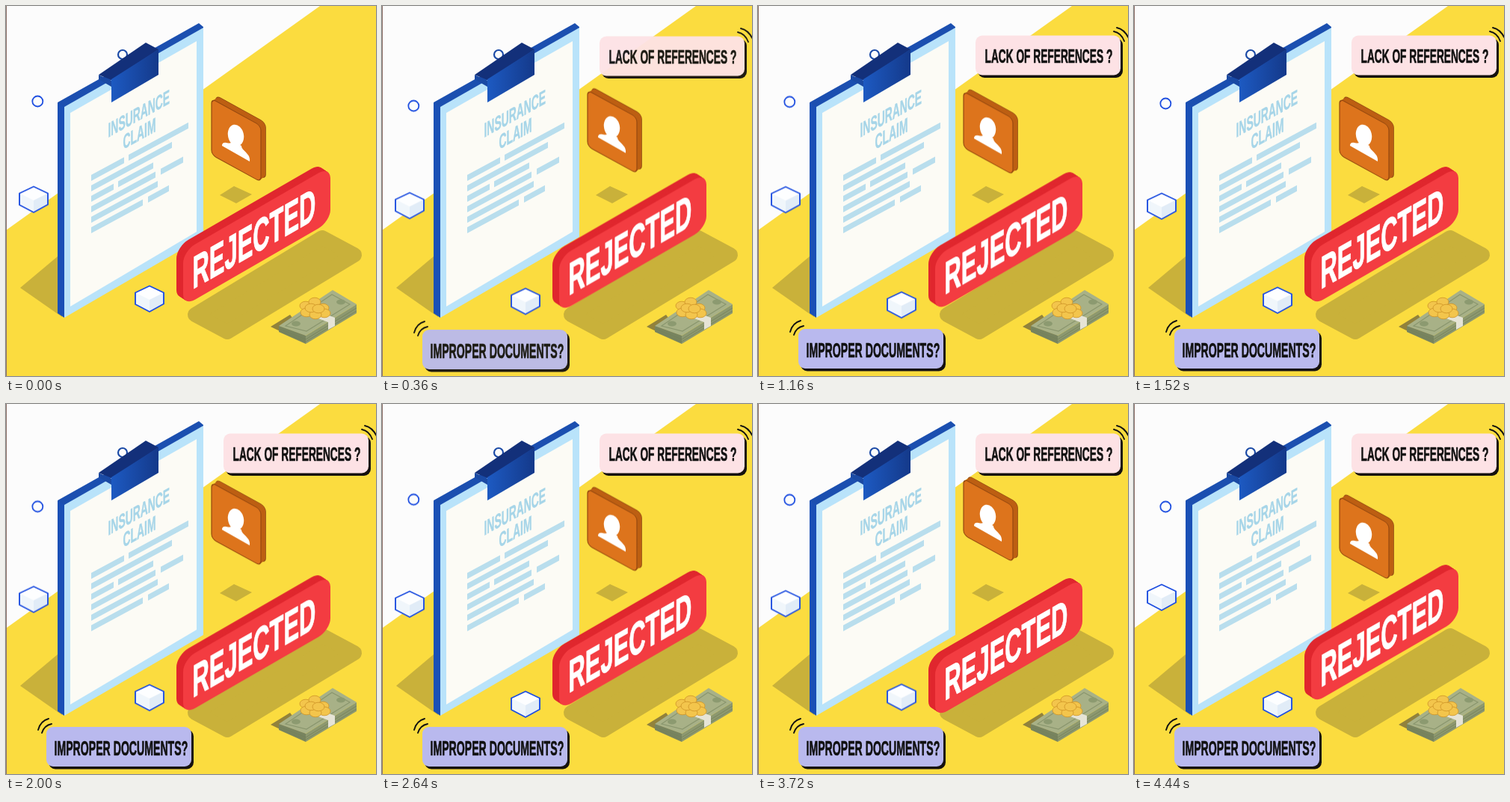
Write an HTML page that moves like this. It is 495 px wide and 495 px high and loops after 4480 ms.

```html
<!DOCTYPE html>
<html lang="en">
<head>
<meta charset="utf-8">
<title>Insurance claim rejected</title>
<style>
  html, body { margin: 0; width: 100%; height: 100%; overflow: hidden; background: #fcfcfc; }
  svg { display: block; width: 495px; height: 495px; }
  text { font-family: "Liberation Sans", Arial, sans-serif; font-weight: 700; stroke-linejoin: round; }

  .bob { animation: bob 1493.333ms ease-in-out infinite; }
  .stamp { --dy: 18px; }
  .tile { --dy: -24px; }
  .boxA { --dy: 10px; animation-duration: 1120ms; animation-delay: -40ms; }
  .boxB { --dy: 10px; animation: bob5 4480ms ease-in-out infinite; }
  .dot { --dy: 10px; animation: bob7 4480ms ease-in-out infinite; }
  .bubble { animation: enter 4480ms cubic-bezier(.2, .7, .3, 1) infinite; }

  @keyframes bob {
    0%, 100% { transform: translateY(0); }
    50% { transform: translateY(var(--dy)); }
  }
  /* an odd number of half swings, so the loop ends on the far side */
  @keyframes bob5 {
    0%, 40%, 80% { transform: translateY(0); }
    20%, 60%, 100% { transform: translateY(var(--dy)); }
  }
  @keyframes bob7 {
    0%, 28.571%, 57.143%, 85.714% { transform: translateY(0); }
    14.286%, 42.857%, 71.429%, 100% { transform: translateY(var(--dy)); }
  }
  @keyframes enter {
    0%, .8% { opacity: 0; transform: translateY(24px); }
    12.5%, 100% { opacity: 1; transform: none; }
  }
</style>
</head>
<body>
<svg viewBox="0 0 495 495" xmlns="http://www.w3.org/2000/svg">
  <defs>
    <linearGradient id="clipFront" x1="0" y1="0" x2="1" y2="0">
      <stop offset="0" stop-color="#1d5ac2"/>
      <stop offset="1" stop-color="#14398a"/>
    </linearGradient>
    <g id="box">
      <path d="M37 241.500 56 250.500V265.500L37 276 18 266V250.500Z" fill="#fdfeff"/>
      <path d="M37 260 55 251V265L37 275Z" fill="#e1ecf7"/>
      <path d="M37 260 19 251V266L37 275Z" fill="#f0f6fb"/>
      <path d="M37 241.500 56 250.500V265.500L37 276 18 266V250.500Z" fill="none" stroke="#1f4fe0" stroke-width="1.900" stroke-linejoin="round"/>
    </g>
    <rect id="plate" width="197" height="74" rx="16" transform="matrix(1 -.577 0 1 237 328)"/>
    <rect id="card" width="66" height="75" rx="6" transform="matrix(1 .55 0 1 275 124)"/>
  </defs>

  <rect width="495" height="495" fill="#fcfcfc"/>
  <path d="M420 0H495V495H0V300Z" fill="#fbdc3f"/>
  <rect width="1" height="495" fill="#8d6f68"/>

  <!-- ground shadows -->
  <g fill="#c9b13a">
    <path d="M19 377 75 330V416Z"/>
    <path d="M286 253 305 241 329 252 308 264Z"/>
    <path d="M253 413 423 310 466 333 296 436Z" stroke="#c9b13a" stroke-width="20" stroke-linejoin="round"/>
  </g>

  <!-- clipboard -->
  <path d="M69 129 258 23 264 28V40L78 146Z" fill="#1b4fb0"/>
  <path d="M69 129 78 135V417L69 411Z" fill="#1a50b6"/>
  <path d="M78 135 264 29V309L78 417Z" fill="#b9e3fa"/>
  <path d="M86 143 255 47V302L86 402Z" fill="#fcfbf5"/>
  <circle cx="156" cy="65" r="6" fill="none" stroke="#1b4aa6" stroke-width="2.200"/>
  <path d="M124 92 141 100V108L124 98Z" fill="#1a4aa4"/>
  <path d="M124 92 187 49 204 58 141 99Z" fill="#13307a"/>
  <path d="M141 98 204 58V92L141 129Z" fill="url(#clipFront)"/>
  <g fill="#a6d5e8" stroke="#a6d5e8" stroke-width=".5" font-size="27">
    <text transform="matrix(.515 -.286 0 1 136.500 176)">INSURANCE</text>
    <text transform="matrix(.515 -.286 0 1 156.500 192)">CLAIM</text>
  </g>
  <g id="lines" fill="#b9deed"></g>

  <g class="bob dot"><circle cx="42.300" cy="127.500" r="7" fill="none" stroke="#1f4fe0" stroke-width="1.800"/></g>
  <g class="bob boxA"><use href="#box"/></g>
  <g class="bob boxB"><use href="#box" x="155" y="133"/></g>

  <!-- money -->
  <path d="M354 429 380 413 401 441 385 444Z" fill="#91823c"/>
  <path d="M365 428 401 441V452L365 436Z" fill="#78845f"/>
  <path d="M401 441 469 399V411L401 452Z" fill="#8d986f"/>
  <path d="M365 428 437 380 469 399 401 441Z" fill="#a8b187"/>
  <path d="M374 428 436 386 460 399 402 435Z" fill="none" stroke="#8a966e" stroke-width="1.200"/>
  <path d="M366 432 401 446 469 404M366 434.500 401 449 469 408" fill="none" stroke="#74805a" stroke-width=".8"/>
  <ellipse cx="388" cy="425" rx="6" ry="3.500" fill="#8c9a70"/>
  <ellipse cx="448" cy="396" rx="6" ry="3.500" fill="#8c9a70"/>
  <path d="M394 409 403 403 440 417V428L431 433V423Z" fill="#e6e4d6"/>
  <g id="coins" fill="#f3c54c" stroke="#d39a2c" stroke-width=".9"></g>

  <!-- person tile -->
  <g class="bob tile">
    <use href="#card" x="6" y="-4" fill="#bd5f13" stroke="#8a430f" stroke-width="1.600"/>
    <g data-extrude="card" data-dx="6" data-dy="-4" fill="#bd5f13"></g>
    <use href="#card" fill="#dd741c" stroke="#94480f" stroke-width="1.200"/>
    <g fill="#fff">
      <ellipse cx="307.500" cy="173" rx="10.500" ry="14.500" transform="rotate(-12 307.500 173)"/>
      <path d="M302 180 315 187C315 191 318 192 322 197Q327 202 326 208L289 187Q289 182 295 183C300 184 302 184 302 180Z"/>
    </g>
  </g>

  <!-- rejected plate -->
  <g class="bob stamp">
    <g data-extrude="plate" data-dx="-9" data-dy="-6" fill="#e0272e"></g>
    <use href="#plate" fill="#f33c41"/>
    <text font-size="61" fill="#fff" stroke="#fff" stroke-width="1.200" transform="matrix(.507 -.29 0 1 249.500 379)">REJECTED</text>
  </g>

  <!-- speech bubbles -->
  <g class="bubble">
    <rect x="294" y="43" width="194" height="53" rx="9" fill="#15110f"/>
    <rect x="291" y="39.500" width="194" height="53" rx="9" fill="#fde2e5"/>
    <text font-size="26" fill="#111" stroke="#111" stroke-width=".7" transform="matrix(.528 0 0 1 303.500 75.500)">LACK OF REFERENCES ?</text>
    <path d="M480 29Q490 31 496 43M476 34Q486 36 490 47" fill="none" stroke="#111" stroke-width="1.900" stroke-linecap="round"/>
  </g>
  <g class="bubble">
    <rect x="57" y="435.500" width="194" height="53" rx="9" fill="#15110f"/>
    <rect x="54" y="432" width="194" height="53" rx="9" fill="#b9b9ee"/>
    <text font-size="27" fill="#111" stroke="#111" stroke-width=".7" transform="matrix(.523 0 0 1 64.500 470)">IMPROPER DOCUMENTS?</text>
    <path d="M43 436Q46 424 57 421M48 440Q51 430 61 428" fill="none" stroke="#111" stroke-width="1.900" stroke-linecap="round"/>
  </g>
</svg>
<script>
  const add = (parent, tag, attrs) => {
    const el = document.createElementNS('http://www.w3.org/2000/svg', tag);
    for (const key in attrs) el.setAttribute(key, attrs[key]);
    parent.appendChild(el);
  };

  // Text bars on the paper: [start, end] pairs per row.
  const rows = [
    [[114, 158], [164, 244]],
    [[114, 222]],
    [[114, 144], [150, 197]],
    [[114, 200], [207, 237]],
    [[114, 203]],
    [[114, 183], [190, 218]]
  ];
  const lines = document.getElementById('lines');
  rows.forEach((row, i) => row.forEach(([a, b]) => {
    const y = x => 226 + i * 14 - (x - 114) * .54;
    add(lines, 'path', { d: `M${a} ${y(a)}L${b} ${y(b)}v8L${a} ${y(a) + 8}Z` });
  }));

  const coins = document.getElementById('coins');
  [[401, 401], [413, 396], [424, 404], [402, 410], [426, 411], [414, 413], [408, 404], [418, 405]]
    .forEach(([cx, cy]) => add(coins, 'ellipse', { cx, cy, rx: 8, ry: 5.8 }));

  // Thick edges: copies of the face swept from back to front.
  document.querySelectorAll('[data-extrude]').forEach(g => {
    const { extrude, dx, dy } = g.dataset;
    for (let k = 10; k > 0; k--) {
      add(g, 'use', { href: '#' + extrude, x: dx * k / 10, y: dy * k / 10 });
    }
  });
</script>
</body>
</html>
```
